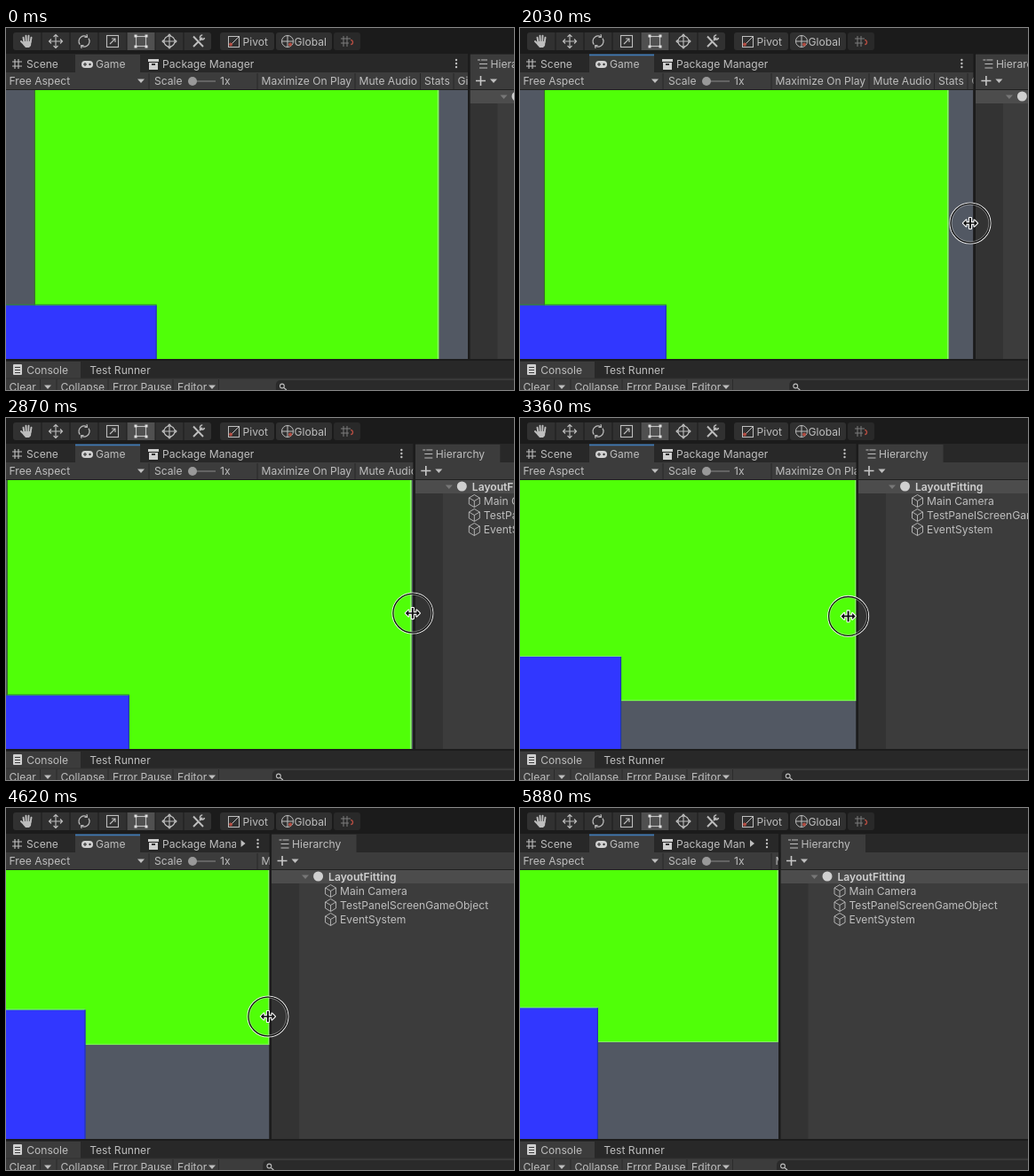
Animation of 572x408 px, one loop 6160 ms. Source, as an HTML page with a canvas:

```html
<!DOCTYPE html>
<html lang="en">
<head>
<meta charset="utf-8">
<title>Editor panel resize</title>
<style>
  html, body { margin: 0; width: 572px; height: 408px; overflow: hidden; background: #191919; }
  canvas { display: block; }
</style>
</head>
<body>
<canvas id="stage" width="572" height="408"></canvas>
<script>
const W = 572, H = 408, LOOP = 6160, STEP = 70;
const TOP = 70, BOTTOM = 373;
const ctx = document.getElementById('stage').getContext('2d');
const FONT = '12.1px Inter, "Liberation Sans", sans-serif';
const TEXT = '#bebebe', PANEL = '#3c3c3c', DARK = '#282828', LINE = '#202020';

// Eased progress from 0 to 1 between times a and b
function ease(t, a, b) {
  const u = Math.min(1, Math.max(0, (t - a) / (b - a)));
  return u * u * (3 - 2 * u);
}

// The divider is dragged left in three pulls
const divider = t => 521 - 62 * ease(t, 1735, 2920) - 94 * ease(t, 2900, 3512) - 73 * ease(t, 3440, 4860);

// The pointer glides in, leads the divider by one step, then leaves at the bottom
function pointerAt(t) {
  const rise = ease(t, 70, 700), cross = ease(t, 700, 1050);
  const grab = ease(t, 1190, 1680), drag = ease(t, 2800, 4620);
  const release = ease(t, 4900, 5460), leave = ease(t, 5530, 5880);
  return {
    x: divider(t + STEP) - 412 + 79 * rise + 337 * cross - 4 * grab - 15 * release - 168 * leave,
    y: 380 - 91 * rise - 48 * cross - 21 * grab + 15 * drag + 13 * release + 185 * leave
  };
}

function box(x, y, w, h, color) {
  ctx.fillStyle = color;
  ctx.fillRect(x, y, w, h);
}

function frame(x, y, w, h, color, width) {
  ctx.strokeStyle = color;
  ctx.lineWidth = width;
  ctx.strokeRect(x, y, w, h);
}

function round(x, y, w, h, r, color) {
  ctx.fillStyle = color;
  ctx.beginPath();
  ctx.roundRect(x, y, w, h, r);
  ctx.fill();
}

function label(s, x, y, color = TEXT, weight = '') {
  ctx.font = weight + ' ' + FONT;
  ctx.fillStyle = color;
  ctx.fillText(s, x, y + 4.5);
}

// Strokes open polylines given as flat coordinate lists
function lines(color, width, ...paths) {
  ctx.strokeStyle = color;
  ctx.lineWidth = width;
  ctx.beginPath();
  for (const p of paths) {
    ctx.moveTo(p[0], p[1]);
    for (let i = 2; i < p.length; i += 2) ctx.lineTo(p[i], p[i + 1]);
  }
  ctx.stroke();
}

function poly(color, ...p) {
  ctx.fillStyle = color;
  ctx.beginPath();
  for (let i = 0; i < p.length; i += 2) ctx.lineTo(p[i], p[i + 1]);
  ctx.closePath();
  ctx.fill();
}

function arc(x, y, r, a, b, color, width) {
  ctx.strokeStyle = color;
  ctx.lineWidth = width;
  ctx.beginPath();
  ctx.arc(x, y, r, a, b);
  ctx.stroke();
}

const ring = (x, y, r, color, width) => arc(x, y, r, 0, Math.PI * 2, color, width);

function disc(x, y, r, color) {
  ctx.fillStyle = color;
  ctx.beginPath();
  ctx.arc(x, y, r, 0, Math.PI * 2);
  ctx.fill();
}

function clipped(x, y, w, h, paint) {
  ctx.save();
  ctx.beginPath();
  ctx.rect(x, y, w, h);
  ctx.clip();
  paint();
  ctx.restore();
}

const down = (x, y, color = TEXT) => poly(color, x - 4, y - 2, x + 4, y - 2, x, y + 2.5);

function fourArrows(x, y, r, head) {
  for (let i = 0; i < 4; i++) {
    ctx.save();
    ctx.translate(x, y);
    ctx.rotate(i * Math.PI / 2);
    lines(TEXT, 1.1, [0, 0, r, 0], [r - head, -head, r, 0, r - head, head]);
    ctx.restore();
  }
}

function handIcon(x, y) {
  ctx.lineCap = 'round';
  for (let i = -1.5; i < 2; i++) lines(TEXT, 1.9, [x + i * 2.4, y + 1, x + i * 3, y - 6.5 + i * i]);
  lines(TEXT, 1.9, [x - 3, y + 4, x - 7, y]);
  ctx.lineCap = 'butt';
  poly(TEXT, x - 4.5, y, x + 4.5, y, x + 4, y + 5, x + 2, y + 7, x - 2, y + 7, x - 4.5, y + 4);
}

function rotateIcon(x, y) {
  for (const s of [1, -1]) {
    arc(x, y, 6, s > 0 ? 2.5 : -.6, s > 0 ? 5.2 : 2.1, TEXT, 1.2);
    lines(TEXT, 1.1, [x + s * 3, y - s * 8, x + s * 3.5, y - s * 4.8, x + s * .5, y - s * 4.5]);
  }
}

function toolbar() {
  const y = 15;
  box(0, 0, W, 29, '#1b1b1b');
  round(8, 5, 223, 20, 3, '#313131');
  box(136, 5, 32, 20, '#505050');
  for (let x = 40; x < 210; x += 32) box(x - .5, 5, 1, 20, '#1d1d1d');
  handIcon(24, y);
  fourArrows(56, y, 7.5, 2.5);
  rotateIcon(88, y);
  frame(113.5, 8.5, 13, 13, TEXT, 1.1);
  lines(TEXT, 1.1, [117, 18, 123, 12], [119, 12, 123, 12, 123, 16]);
  frame(146.5, 9.5, 11, 11, TEXT, 1.1);
  for (const a of [146, 158]) for (const b of [9, 21]) box(a - 1.5, b - 1.5, 3, 3, '#e0e0e0');
  ring(184, y, 6, TEXT, 1.1);
  fourArrows(184, y, 8, 1.8);
  lines(TEXT, 1.9, [211, 9.5, 222, 21], [211, 21, 216, 16], [218, 14, 221, 11]);
  arc(221, 10.5, 2.5, .2, 4.8, TEXT, 1.5);

  round(241, 5, 61, 20, 3, '#303030');
  frame(250.5, 9.5, 12, 12, TEXT, 1);
  lines(TEXT, 1, [254, 18, 262, 10]);
  disc(253, 18.5, 2, '#b34d42');
  label('Pivot', 266.5, y);
  round(304, 5, 63, 20, 3, '#303030');
  ring(317, y, 6.5, TEXT, 1);
  lines(TEXT, 1, [311, y, 323, y], [317, 8.5, 317, 21.5]);
  disc(320, 18.5, 2, '#b34d42');
  label('Global', 324.5, y);
  round(369, 5, 30, 20, 3, '#292929');
  lines('#7d7d7d', 1, [380, 9, 380, 21], [384, 9, 384, 21], [377, 12, 388, 12], [377, 17, 386, 17]);
  arc(388, 16, 2.5, -1.5, 1.5, '#b34d42', 1.4);
}

function gameTabs(D, focused) {
  box(0, 29, D, 21, DARK);
  box(78, 30, 73, 20, PANEL);
  if (focused) box(78, 29.5, 73, 1.8, '#3f78b2');
  lines(TEXT, 1.1, [10, 35, 10, 46], [14, 35, 14, 46], [7, 38, 18, 38], [7, 43, 18, 43]);
  label('Scene', 23, 40);
  round(85, 37, 13, 8, 4, '#d2d2d2');
  lines('#333', 1.1, [87, 41, 91, 41], [89, 39, 89, 43]);
  disc(94.5, 41, 1.2, '#333');
  label('Game', 101, 40);

  const tight = D < 312;
  clipped(150, 29, (tight ? D - 38.5 : D) - 150, 21, () => {
    box(160, 35, 12, 3, '#cfcfcf');
    box(161, 39, 10, 8, '#cfcfcf');
    box(164, 40, 4, 2, '#333');
    label('Package Manager', 176, 40);
  });
  if (tight) poly(TEXT, D - 33, 36, D - 33, 44, D - 28, 40);
  for (let i = -1; i < 2; i++) disc(D - 14, 40 + i * 4, 1.2, TEXT);
}

function gameBar(D) {
  const y = 59.5;
  box(0, 50, D, 20, PANEL);
  box(0, 69, D, 1, LINE);
  clipped(0, 50, D, 19, () => {
    label('Free Aspect', 3.5, y);
    down(152, y);
    box(160.5, 51, 1, 18, DARK);
    label('Scale', 167, y);
    box(212, 59, 24, 2, '#636363');
    disc(210, y + .5, 5, '#999');
    label('1x', 241, y);
    const items = [['Maximize On Play', 287.5], ['Mute Audio', 397.5], ['Stats', 471], ['Gizmos', 508.5]];
    for (const [s, x] of items) {
      box(x - 5, 51, 1, 18, DARK);
      label(s, x, y);
    }
  });
}

// The 3:2 green area is fitted to the view, centred sideways and pinned to the top;
// its height reacts slightly ahead of the divider
function gameView(D, ahead) {
  const vw = D - 1, vh = BOTTOM - TOP;
  const gw = Math.min(vw, vh * 1.5), gh = Math.min(vh, ahead / 1.5);
  const gx = (vw - gw) / 2, bx = gx + gw * .3 + .5, by = TOP + gh * .8;
  const short = gh < vh - 1;
  ctx.filter = 'blur(.5px)';
  box(0, TOP, vw, vh, '#525863');
  box(gx, TOP, gw, gh, '#50ff08');
  box(gx + gw - 1.5, TOP, 1.5, gh, '#8cf56a');
  if (gx > 1) box(gx - 1, TOP, 1, gh, '#337322');
  if (short) box(0, TOP + gh - 1, vw, 1, '#83ef64');
  box(0, by, bx, BOTTOM - by, '#3137ff');
  box(0, by - 1, bx, 1, short ? '#77f46b' : '#2b8a38');
  box(bx - 1, by, 1, BOTTOM - by, '#2036a0');
  ctx.filter = 'none';
}

function cube(x, y) {
  lines(TEXT, .9, [x, y - 7, x + 6, y - 3.5, x + 6, y + 3.5, x, y + 7, x - 6, y + 3.5, x - 6, y - 3.5, x, y - 7],
    [x - 6, y - 3.5, x, y, x + 6, y - 3.5], [x, y, x, y + 7]);
}

function hierarchy(D) {
  const x = D + 1.5;
  box(D - 1, 29, 2.5, 345, '#1c1c1c');
  clipped(x, 29, W - x, 345, () => {
    box(x, 29, W, 21, DARK);
    box(x, 30, 95.5, 20, PANEL);
    lines(TEXT, 1.1, [D + 10, 36, D + 13, 36], [D + 14, 36, D + 21, 36],
      [D + 12, 40.5, D + 21, 40.5], [D + 12, 45, D + 21, 45]);
    label('Hierarchy', D + 24.5, 40);
    box(x, 50, W, 20, PANEL);
    box(x, 69, W, 1, LINE);
    lines('#c8c8c8', 1.6, [D + 8, 59.5, D + 19, 59.5], [D + 13.5, 54, D + 13.5, 65]);
    down(D + 28, 59.5);
    box(x, 70, W, 304, '#3c3c3c');
    box(x, 85, 31, 289, '#333');
    box(x, 70, W, 15, '#4c4c4c');
    down(D + 39.5, 77.5, '#777');
    disc(D + 54, 77, 5.5, '#d0d0d0');
    label('LayoutFitting', D + 65.5, 77, '#d0d0d0', '600');
    ['Main Camera', 'TestPanelScreenGameObject', 'EventSystem'].forEach((s, i) => {
      const y = 93.5 + i * 16;
      cube(D + 68, y);
      label(s, D + 78.5, y - .3);
    });
  });
}

function consolePanel(D) {
  const y = 404.5;
  box(0, 373, W, 2, '#1c1c1c');
  box(0, 375, W, 20, DARK);
  box(0, 376, 84, 19, PANEL);
  round(8, 379, 10, 12, 1, '#cfcfcf');
  for (let i = 0; i < 3; i++) box(10, 382 + i * 3, 6, 1, PANEL);
  label('Console', 23.2, 385);
  label('Test Runner', 94.2, 385);
  box(0, 395, W, 13, PANEL);
  box(0, 394.5, W, 1, '#303030');
  for (const x of [38, 56.5, 114.5, 187.5, 239]) box(x, 396, 1, 12, '#2b2b2b');
  label('Clear', 3.5, y);
  down(47, y);
  label('Collapse', 61.5, y);
  label('Error Pause', 120, y);
  label('Editor', 193, y);
  down(232, y);
  const sx = 289 + (D - 292) * .065;
  round(sx, 397, W, 16, 5, '#2a2a2a');
  ring(sx + 7, 403.5, 2.4, TEXT, 1.1);
  lines(TEXT, 1.2, [sx + 9, 405.5, sx + 12, 408]);
}

const RESIZE = new Path2D('M-8 0L-4.5-3.5V-.8H-1V-6H1V-.8H4.5V-3.5L8 0L4.5 3.5V.8H1V6H-1V.8H-4.5V3.5Z');
const ARROW = new Path2D('M0 0V14L3.4 11L5.8 16.2L8 15.2L5.7 10H10Z');

function pointer({ x, y }, shape) {
  ring(x, y, 23, '#ececec', 1.1);
  ring(x, y, 21.9, '#101010', 1.3);
  ring(x, y, 20.9, 'rgba(236,236,236,.5)', .8);
  ctx.save();
  ctx.translate(x, y);
  ctx.lineJoin = 'round';
  ctx.strokeStyle = '#fff';
  ctx.lineWidth = 2.2;
  ctx.stroke(shape);
  ctx.fillStyle = '#111';
  ctx.fill(shape);
  ctx.restore();
}

function draw(t) {
  const D = divider(t);
  box(0, 0, W, H, '#191919');
  toolbar();
  gameView(D, divider(t + STEP / 2) - 1);
  gameTabs(D, t >= 1610);
  gameBar(D);
  hierarchy(D);
  consolePanel(D);
  if (t >= 70 && t < 5880) pointer(pointerAt(t), t >= 1050 && t < 5250 ? RESIZE : ARROW);
}

const start = performance.now();
function tick() {
  const t = (performance.now() - start) % LOOP;
  draw(Math.floor(t / STEP) * STEP);
  requestAnimationFrame(tick);
}
tick();
</script>
</body>
</html>
```
